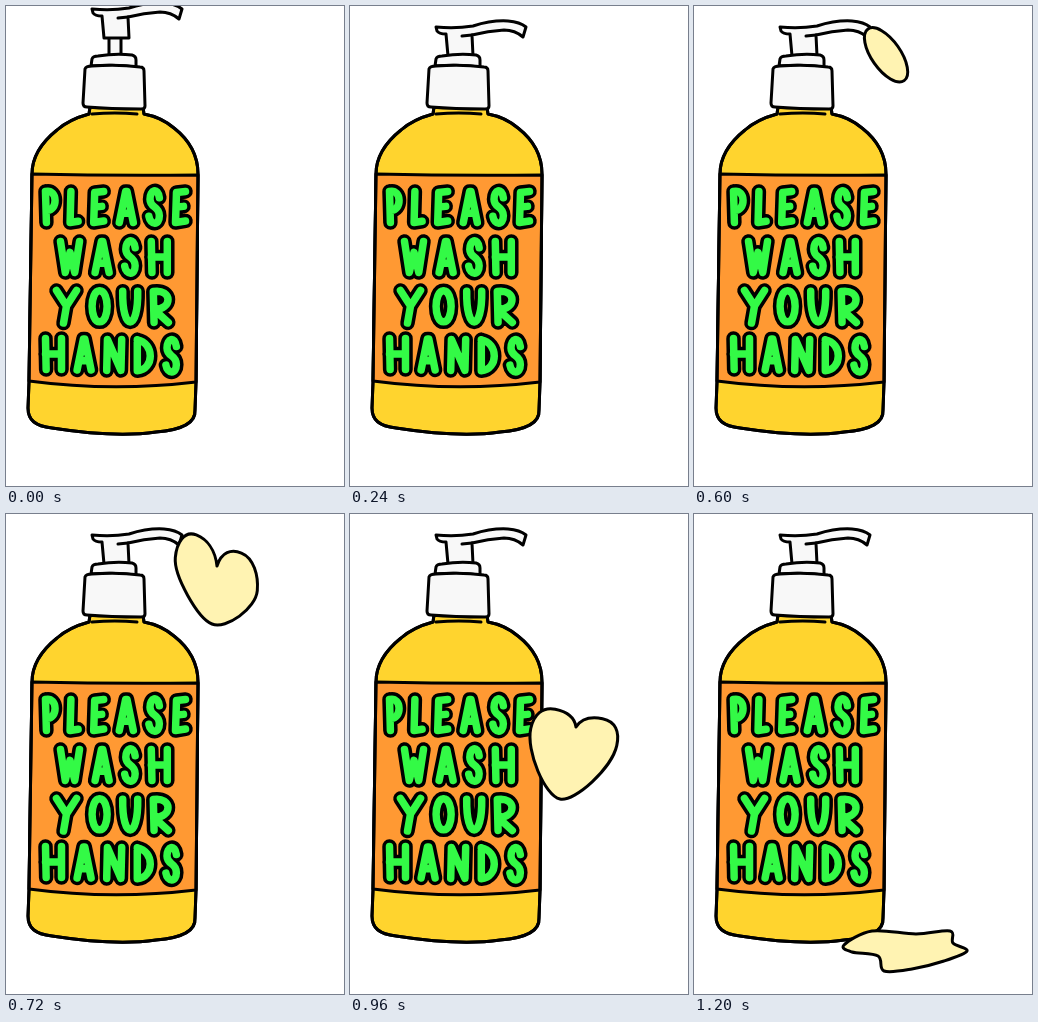
Animation of 338 by 480 pixels, one loop 1.44 s. Source, as an HTML page with a canvas:

```html
<!DOCTYPE html>
<html lang="en">
<head>
<meta charset="utf-8">
<title>Please wash your hands</title>
<style>
html, body { margin: 0; width: 100%; height: 100%; overflow: hidden; background: #fff; }
canvas { display: block; width: 338px; height: 480px; }
</style>
</head>
<body>
<canvas id="stage" width="338" height="480" role="img" aria-label="PLEASE WASH YOUR HANDS"></canvas>
<script>
const ctx = document.getElementById('stage').getContext('2d');
const STEP = 120, STEPS = 12;
const INK = '#000', WHITE = '#f8f8f8', YELLOW = '#ffd42e', ORANGE = '#ff9933', GREEN = '#33fa46', CREAM = '#fff3b2';

const bottle = new Path2D('M84 101L83 108C72 111 60 116 51 124C36 136 26 150 26 168L23 376L22 402C22 414 29 420 46 422Q110 432 150 426C175 424 190 418 189 404L190 377L192 168C192 148 182 133 168 122Q155 111 138 108L137 101Z');
const label = new Path2D('M26 168Q110 170 192 169L190 376Q106 386 23 375Z');
const neckLine = new Path2D('M86 108Q109 106 131 108');
const cap = new Path2D('M79 63Q80 60 86 60Q112 58 134 61Q138 61 138 65L139 100Q139 103 135 103Q104 103 81 101Q77 101 77 97Z');
const collar = new Path2D('M85 60L86 53Q87 50 92 50Q110 47 126 49Q130 50 130 54L130 61Q108 58 85 60Z');
const head = new Path2D('M86 21Q105 23 123 20Q142 14 158 15Q170 16 176 21L173 31Q165 24 154 24Q138 25 122 29L123 50L98 50L96 28Q89 28 87 25Z');
const spoutLine = new Path2D('M122 29L112 30');

// Letter centre lines on a 10 x 10 grid, with the letter's width in pixels
const glyphs = {
  P: [24, 'M0 0L1 10M0 0C14 -1 14 6.5 1 6'],
  L: [23, 'M1 0L0 10L10 9.6'],
  E: [25, 'M10 0L1 .3L0 10L10 9.5M1 5L8 4.8'],
  A: [29, 'M0 10L4.5 0L5.5 0L10 10M2 7L8 7'],
  S: [26, 'M9.5 2C8 -1.5 1 -.5 1 2.5C1 5.5 9.5 4.5 9.5 7.8C9.5 11 1.5 11 0 8'],
  W: [34, 'M0 0L2.5 10L5 3.5L7.5 10L10 0'],
  H: [31, 'M0 0L.4 10M10 0L10 10M0 5L10 5'],
  Y: [35, 'M0 0L5 5L10 0M5 5L3.5 10.5'],
  O: [30, 'M5 0C-1.7 0 -1.7 10 5 10C11.7 10 11.7 0 5 0'],
  U: [30, 'M0 0C-.5 13.3 10.5 13.3 10 0'],
  R: [30, 'M.5 10L0 0C13 -1 13 6 .5 5.8L10 10'],
  N: [30, 'M0 10L.5 0L9.5 10L10 0'],
  D: [28, 'M0 0L0 10C13.3 9.5 13.3 1 0 0']
};
const lettering = new Path2D();
addWord('PLEASE', 32, 178, 0);
addWord('WASH', 47, 228, 0);
addWord('YOUR', 43, 277, .01);
addWord('HANDS', 32, 325, .015);

function addWord(text, x, y, slope) {
  const inset = 7.5, height = 46, gap = .6;
  for (const ch of text) {
    const [width, d] = glyphs[ch];
    const m = new DOMMatrix([(width - 2 * inset) / 10, 0, 0, (height - 2 * inset) / 10, x + inset, y + inset]);
    lettering.addPath(new Path2D(d), m);
    x += width + gap;
    y += width * slope;
  }
}

function line(path, color = INK, width = 3) {
  ctx.strokeStyle = color;
  ctx.lineWidth = width;
  ctx.stroke(path);
}

function paint(path, fill, width = 3) {
  ctx.fillStyle = fill;
  ctx.fill(path);
  line(path, INK, width);
}

function drawPump(lift) {
  const stem = new Path2D();
  stem.rect(103, 30, 12, 30);
  paint(stem, WHITE);
  ctx.save();
  ctx.translate(0, -lift);
  paint(head, WHITE);
  line(spoutLine);
  ctx.restore();
  paint(collar, WHITE);
}

function drawBottle() {
  paint(bottle, YELLOW);
  paint(label, ORANGE);
  line(bottle);
  line(neckLine);
  paint(cap, WHITE);
  line(lettering, INK, 14.5);
  line(lettering, GREEN, 7.5);
}

// A drop hanging from the spout, growing along a fixed direction
function drawDrop(length) {
  const angle = 55 * Math.PI / 180, r = length / 2;
  const drop = new Path2D();
  drop.ellipse(174 + r * Math.cos(angle), 23 + r * Math.sin(angle), r, r * .46, angle, 0, 2 * Math.PI);
  paint(drop, CREAM);
}

// Heart poses: notch x y, tip x y, half width, slope across the lobes, lobe rise
const poses = [
  [211, 52, 206, 110, 41, .4, 22],
  [226, 213, 210, 285, 43, .2, 13],
  [214, 341, 217, 415, 42, -.13, 12]
];

function heartPose(t) {
  const i = Math.min(Math.floor(t), poses.length - 2);
  return poses[i].map((v, k) => v + (poses[i + 1][k] - v) * (t - i));
}

function drawHeart([nx, ny, tx, ty, half, slope, rise]) {
  const r = -rise / (ty - ny), unit = new Path2D(), heart = new Path2D();
  for (const s of [-1, 1]) {
    const side = new Path2D(`M0 0C${.08 * s} ${.7 * r} ${.3 * s} ${r} ${.55 * s} ${r}` +
      `C${.85 * s} ${r} ${s} ${r * .3} ${s} .14C${s} .45 ${.35 * s} 1 0 1`);
    unit.addPath(side);
  }
  heart.addPath(unit, new DOMMatrix([half, half * slope, tx - nx, ty - ny, nx, ny]));
  ctx.fillStyle = CREAM;
  ctx.fill(heart);
  line(heart);
}

const puddle = [[150, 431], [178, 417], [222, 420], [256, 417], [259, 429], [273, 437],
  [250, 447], [218, 455], [190, 457], [184, 442], [158, 438]];

function drawPuddle() {
  const n = puddle.length, at = i => puddle[(i + n) % n], path = new Path2D();
  path.moveTo(...at(0));
  for (let i = 0; i < n; i++) {
    const [a, b, c, d] = [-1, 0, 1, 2].map(k => at(i + k));
    path.bezierCurveTo(b[0] + (c[0] - a[0]) / 6, b[1] + (c[1] - a[1]) / 6,
      c[0] - (d[0] - b[0]) / 6, c[1] - (d[1] - b[1]) / 6, ...c);
  }
  paint(path, CREAM);
}

function drawSoap(step) {
  if (step < 3) return;
  if (step < 6) drawDrop(21 * (step - 2));
  else if (step < 10) drawHeart(heartPose(step < 8 ? (step - 6) / 2 : step - 7));
  else drawPuddle();
}

const start = performance.now();
let shown = -1;

function tick(now) {
  const step = Math.floor(Math.max(0, now - start) / STEP) % STEPS;
  if (step !== shown) {
    shown = step;
    ctx.fillStyle = '#fff';
    ctx.fillRect(0, 0, 338, 480);
    ctx.lineJoin = ctx.lineCap = 'round';
    drawPump(18 * Math.max(0, 1 - step / 2));
    drawBottle();
    drawSoap(step);
  }
  requestAnimationFrame(tick);
}
tick(start);
</script>
</body>
</html>
```
